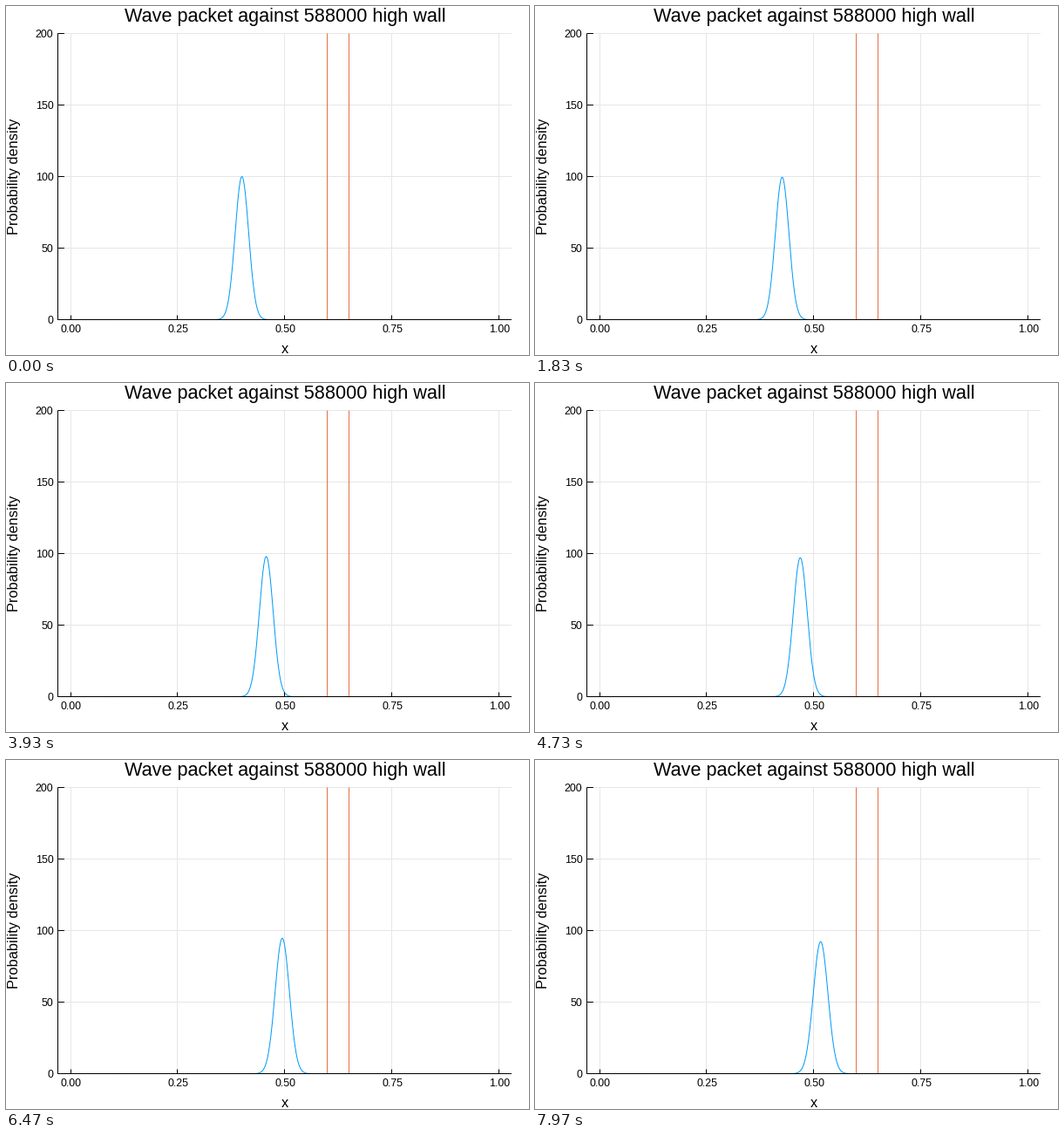
A matplotlib script for the animation above (8 s loop, 600 px wide and 400 px high).

```python
import math
import numpy as np
import matplotlib.pyplot as plt
from matplotlib.animation import FuncAnimation
from matplotlib.patches import Rectangle

W, H, DPI = 600, 400, 100
FRAMES, LOOP = 240, 8000
PX = 72 / DPI  # one pixel in points

LEFT, RIGHT, TOP, BOTTOM = 59.5, 580, 31.5, 359.5
BLUE, ORANGE, GRID = "#009afa", "#e26f46", "#e6e6e6"
FONT = "Liberation Sans"

START, SPEED = 0.4, 0.01458     # packet centre and its drift per second
PEAK, SIGMA, SPREAD = 100, 0.0158, 19.0


def sx(x):
    return LEFT + (x + 0.03) / 1.06 * (RIGHT - LEFT)


def sy(y):
    return BOTTOM - y / 200 * (BOTTOM - TOP)


def crisp(v):
    """Centre of the pixel that holds v."""
    return math.floor(v + 1e-6) + 0.5


def density(x, t):
    grow = np.sqrt(1 + (t / SPREAD) ** 2)
    z = (x - START - SPEED * t) / (SIGMA * grow)
    return PEAK / grow * np.exp(-z ** 2 / 2)


fig = plt.figure(figsize=(W / DPI, H / DPI), dpi=DPI, facecolor="white")
ax = fig.add_axes([0, 0, 1, 1])
ax.set_xlim(0, W)
ax.set_ylim(H, 0)
ax.axis("off")


def line(xs, ys, color, z):
    return ax.plot(xs, ys, color=color, lw=PX, zorder=z, snap=False,
                   solid_capstyle="butt")[0]


def label(x, y, text, size, **kw):
    ax.text(x, y, text, fontsize=size * PX, family=FONT, color="black",
            va="baseline", **kw)


for v in (0, 0.25, 0.5, 0.75, 1):
    x = crisp(sx(v))
    line([x, x], [TOP, BOTTOM], GRID, 1)
    line([x, x], [BOTTOM - 5, BOTTOM], "black", 4)
    label(sx(v) + 0.5, 374, f"{v:.2f}", 12.4, ha="center")

for v in (0, 50, 100, 150, 200):
    y = crisp(sy(v))
    line([LEFT, RIGHT], [y, y], GRID, 1)
    line([LEFT, LEFT + 7.5], [y, y], "black", 4)
    label(54.5, y + 4.5, str(v), 12.4, ha="right")

line([LEFT, LEFT], [TOP, BOTTOM + 0.5], "black", 4)
line([LEFT - 0.5, RIGHT], [BOTTOM, BOTTOM], "black", 4)

for wall in (0.6, 0.65):
    x = crisp(sx(wall))
    line([x, x], [TOP, BOTTOM], ORANGE, 3)

label(320.3, 18, "Wave packet against 588000 high wall", 21.7, ha="center")
label(320, 398, "x", 16.4, ha="center")
label(14, 195.5, "Probability density", 16.4, rotation=90,
      rotation_mode="anchor", ha="center")

grid = np.linspace(0, 1, 1001)
packet = line(sx(grid), sy(density(grid, 0)), BLUE, 2)
packet.set_clip_path(Rectangle((LEFT, TOP), RIGHT - LEFT, BOTTOM - TOP,
                               transform=ax.transData))


def update(i):
    packet.set_ydata(sy(density(grid, i * LOOP / FRAMES / 1000)))
    return (packet,)


anim = FuncAnimation(fig, update, frames=FRAMES, interval=LOOP / FRAMES,
                     repeat=True, repeat_delay=0, blit=False)
plt.show()
```
